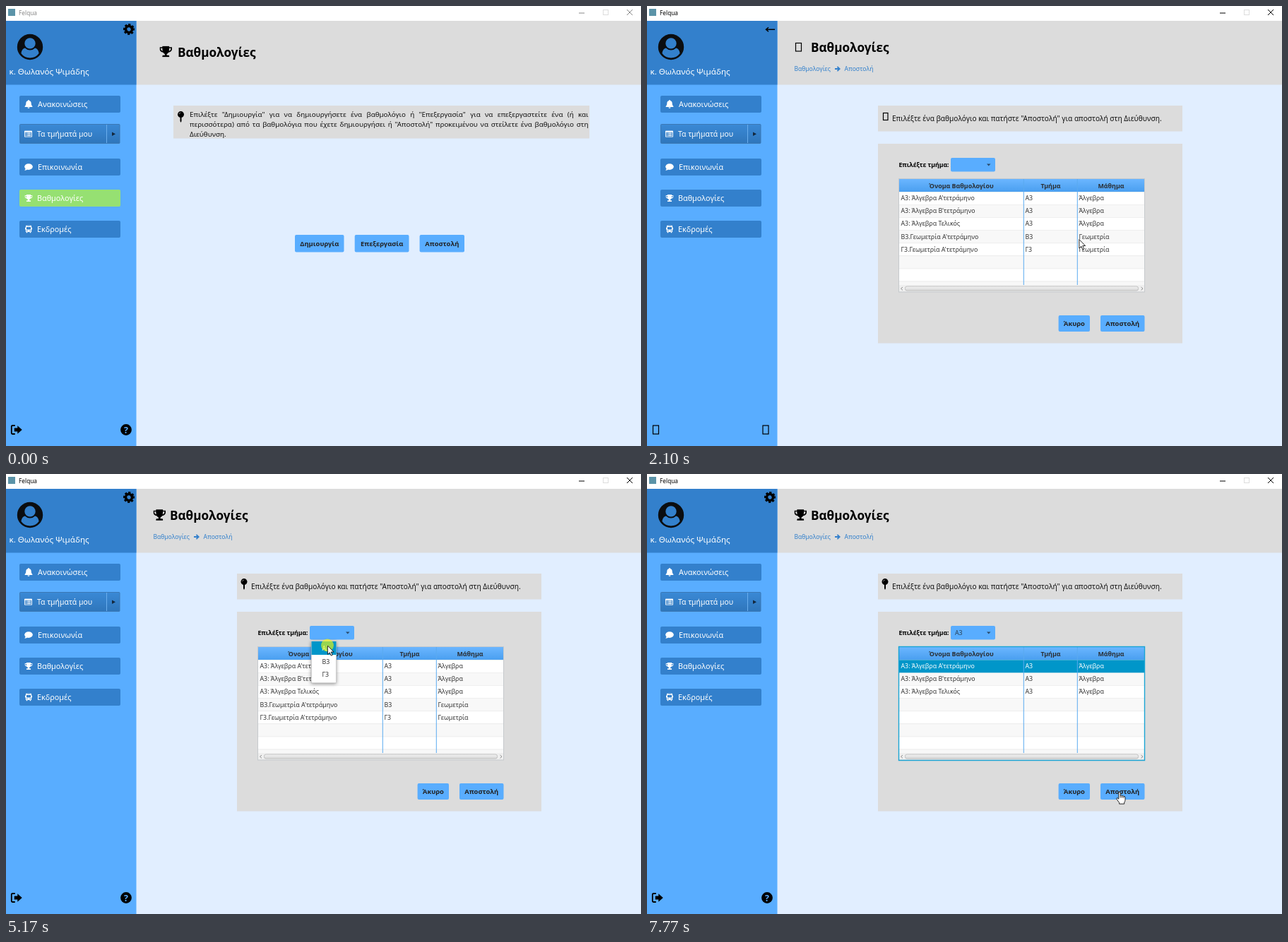
An HTML page for the animation above (8 s loop, 899x623 px).

```html
<!DOCTYPE html>
<html lang="el">
<head>
<meta charset="utf-8">
<title>Felqua</title>
<style>
html, body { margin: 0; width: 100%; height: 100%; overflow: hidden; background: #e1eeff; }
svg { display: block; width: 100%; height: 100%; font-family: "Noto Sans", "Open Sans", sans-serif; }
text { white-space: pre; }
.note { font-size: 9.8px; line-height: 14px; color: #111; }
.note div { white-space: nowrap; }
.note .full { text-align: justify; text-align-last: justify; }
</style>
</head>
<body>
<svg id="stage" viewBox="0 0 899 623" xmlns="http://www.w3.org/2000/svg"></svg>
<script>
const LOOP = 8000;
const BLUE = '#59adff', DEEP = '#3380cc', GRAY = '#dcdcdc', PICK = '#0096c9';
const stage = document.getElementById('stage');

const rect = (x, y, w, h, fill, more = '') =>
  `<rect x="${x}" y="${y}" width="${w}" height="${h}" fill="${fill}" ${more}/>`;
const text = (x, y, size, str, fill = '#111', more = '') =>
  `<text x="${x}" y="${y}" font-size="${size}" fill="${fill}" ${more}>${str}</text>`;
const icon = (id, x, y, w, h, color = '#000') =>
  `<use href="#${id}" x="${x}" y="${y}" width="${w}" height="${h}" color="${color}"/>`;
const group = (id, body) => `<g id="${id}">${body}</g>`;
const symbol = (id, w, h, body) =>
  `<symbol id="${id}" viewBox="0 0 ${w} ${h}" fill="currentColor">${body}</symbol>`;
const tofu = (x, y, w, h) => rect(x, y, w, h, 'none', 'stroke="#000" stroke-width="1.2"');
const bold = 'font-weight="700"';
const mid = bold + ' text-anchor="middle"';
const button = ([x, y, w, h, label]) =>
  rect(x, y, w, h, BLUE, 'rx="2"') + text(x + w / 2, y + h / 2 + 3.5, 9.4, label, '#222', mid);

const homeButtons = [
  [409, 324, 69.5, 24.5, 'Δημιουργία'],
  [493.7, 324, 76.8, 24.5, 'Επεξεργασία'],
  [585.6, 324, 63.4, 24.5, 'Αποστολή']
];
const sendButtons = [
  [582.6, 438, 44.4, 23, 'Άκυρο'],
  [642, 438, 62.5, 23, 'Αποστολή']
];

const defs = `<defs>
<linearGradient id="head" x2="0" y2="1"><stop stop-color="#6bb6ff"/><stop offset="1" stop-color="#4a9ff0"/></linearGradient>
<linearGradient id="split" x2="0" y2="1"><stop stop-color="#3a89d6"/><stop offset="1" stop-color="#2f76bb"/></linearGradient>
<linearGradient id="thumb" x2="0" y2="1"><stop stop-color="#f4f4f4"/><stop offset="1" stop-color="#d6d6d6"/></linearGradient>
<filter id="shade" x="-30%" y="-30%" width="160%" height="160%"><feDropShadow dx="0" dy="1" stdDeviation="2.5" flood-opacity=".45"/></filter>` +
symbol('trophy', 18, 16, `<path fill-rule="evenodd" d="M4 0h10v1.5h4v3c0 2.5-2.5 4.5-5 4.8-.9 1.2-1.8 1.9-2.6 2.2v1.8h2.4c.8 0 1.2.7 1.2 1.3V16H4v-1.4c0-.6.5-1.3 1.2-1.3h2.4v-1.8C6.8 11.2 5.9 10.5 5 9.3 2.5 9 0 7 0 4.5v-3h4zM1.7 3.2v1.3c0 1 1.1 2.2 2.7 2.7A11 11 0 0 1 4 3.2zM16.3 3.2H14c0 1.6-.1 2.9-.4 4 1.6-.5 2.7-1.7 2.7-2.7z"/>`) +
symbol('bell', 12, 13, `<path d="M5.2 0h1.6v1C9 1.4 10 3 10 5c0 2.8 .8 3.8 1.8 4.8v1H.2v-1C1.2 8.800 2 7.8 2 5c0-2 1-3.600 3.2-4zM4.3 11.5h3.4a1.7 1.5 0 0 1-3.4 0z"/>`) +
symbol('list', 12, 10, `<path fill-rule="evenodd" d="M1 0h10q1 0 1 1v8q0 1-1 1H1q-1 0-1-1V1q0-1 1-1zM1 2.5V9h10V2.5z"/><path d="M2 3.4h1.2v1H2zm2.2 0H10v1H4.2zM2 5.3h1.2v1H2zm2.2 0H10v1H4.2zM2 7.2h1.2v1H2zm2.2 0H10v1H4.2z"/>`) +
symbol('chat', 13, 11, `<ellipse cx="6.500" cy="5" rx="6.3" ry="4.7"/><path d="M1.8 7.5q0 2-1.5 3 3 .2 4.7-1.5z"/>`) +
symbol('bus', 11, 12, `<path fill-rule="evenodd" d="M2.5 0h6Q10 0 10 1.5V3.500h1v3h-1V10.500H9V12H7.500V10.500h-4V12H2V10.500H1v-4H0v-3h1v-2Q1 0 2.5 0zM2.200 2.600v3.900h6.600V2.600zM2.200 8v1.300h1.500V8zm5.100 0v1.300h1.500V8zM3.500 1v.7h4V1z"/>`) +
symbol('pin', 10, 16, `<circle cx="5" cy="4.6" r="4.5"/><path d="M4 8.5h2V14l-1 2-1-2z"/><path d="M2.500 4.3Q2.7 2.3 4.8 2" fill="none" stroke="#bbb" stroke-width=".7"/>`) +
symbol('gear', 18, 18, `<g fill="none" stroke="currentColor" transform="rotate(-13 9 9)"><circle cx="9" cy="9" r="6.4" stroke-width="3.2" stroke-dasharray="2.9 2.126"/><circle cx="9" cy="9" r="4.5" stroke-width="3.6"/></g>`) +
symbol('exit', 16, 14, `<path d="M6 1H2.5Q1 1 1 2.5v9Q1 13 2.5 13H6" fill="none" stroke="currentColor" stroke-width="1.9"/><path d="M5 4.6h4.5V1.2L16 7l-6.5 5.8V9.4H5z"/>`) +
symbol('arrow', 8, 8, `<path d="M0 3.1h4.3L2.9 1.5 4 .3 8 4 4 7.7 2.9 6.5l1.4-1.6H0z"/>`) + `</defs>`;

function side(y, id, label, w, h, shift = 0, fill = DEEP) {
  return rect(19, y, 143, 24, fill, 'rx="2"') +
    icon(id, 32 - w / 2, y + 12 - h / 2, w, h, '#fff') +
    text(44 + shift, y + 15.8, 10.8, label, '#fff');
}

const sidebar = rect(0, 21, 184.5, 602, BLUE) + rect(0, 21, 184.5, 90.5, DEEP) +
  `<circle cx="34" cy="58" r="18.2" fill="#0b0d10"/><circle cx="34" cy="52.9" r="7.7" fill="${DEEP}"/>
   <path d="M26.9 59.4Q30 62.5 34 62.5T41.1 59.4Q45.5 60 46.6 66.9 42 73.4 34 73.4T21.4 66.9Q22.5 60 26.9 59.4z" fill="${DEEP}"/>` +
  text(4.5, 97, 11.6, 'κ. Θωλανός Ψιμάδης', '#fff') +
  side(127, 'bell', 'Ανακοινώσεις', 12, 12, 1) +
  rect(19.5, 167.5, 141.5, 27, 'url(#split)', 'stroke="#3b78b4" rx="1"') +
  `<path d="M142.5 168v26" stroke="#6aaeee"/><path d="M150 178.5l5 2.7-5 2.7z" fill="#14283c"/>` +
  icon('list', 26, 176.3, 11, 9.5, '#fff') + text(44, 185, 10.4, 'Τα τμήματά μου', '#fff') +
  side(216, 'chat', 'Επικοινωνία', 12, 11, 1) +
  side(304, 'bus', 'Εκδρομές', 10, 11);

const grades = fill => side(260, 'trophy', 'Βαθμολογίες', 11, 10, 0, fill);

const windowBar = rect(0, 0, 899, 21, '#fff') + rect(3, 4, 10, 10, '#5b93a8') +
  `<g id="caption">${text(18, 12.8, 8.3, 'Felqua', 'currentColor')}
   <path d="M811 10h8M879 5l8 8m0-8l-8 8" stroke="currentColor" fill="none"/></g>
   <rect x="845.5" y="5.5" width="7" height="7" fill="none" stroke="#ddd"/>`;

const sideIcons = icon('gear', 165, 24, 18, 18) + icon('exit', 6.5, 593, 16.5, 14) +
  `<circle cx="170" cy="600" r="7.9"/>` + text(170, 604.6, 12.5, '?', BLUE, mid);

const home = grades('#96e072') +
  icon('trophy', 217.5, 56.5, 17.5, 16) + text(243, 71.5, 17.15, 'Βαθμολογίες', '#000', bold) +
  rect(237, 141, 589, 46.5, GRAY) + icon('pin', 242.5, 149, 10, 16) +
  `<foreignObject x="260" y="147" width="564.5" height="46"><div class="note">
   <div class="full">Επιλέξτε "Δημιουργία" για να δημιουργήσετε ένα βαθμολόγιο ή "Επεξεργασία" για να επεξεργαστείτε ένα (ή και</div>
   <div class="full">περισσότερα) από τα βαθμολόγια που έχετε δημιουργήσει ή "Αποστολή" προκειμένου να στείλετε ένα βαθμολόγιο στη</div>
   <div>Διεύθυνση.</div></div></foreignObject>` +
  homeButtons.map(button).join('');

const rowY = i => 263 + 18.1 * i;
const cells = (i, list, fill) =>
  list.map((s, c) => text([359.5, 535.5, 611.5][c], rowY(i) + 12.2, 8.8, s, fill)).join('');
const rows = [
  ["Α3: Άλγεβρα Α'τετράμηνο", 'Α3', 'Άλγεβρα'],
  ["Α3: Άλγεβρα Β'τετράμηνο", 'Α3', 'Άλγεβρα'],
  ['Α3: Άλγεβρα Τελικός', 'Α3', 'Άλγεβρα'],
  ["Β3.Γεωμετρία Α'τετράμηνο", 'Β3', 'Γεωμετρία'],
  ["Γ3.Γεωμετρία Α'τετράμηνο", 'Γ3', 'Γεωμετρία']
];
const stripes = Array.from({ length: 8 }, (_, i) =>
  rect(357, rowY(i), 347, i < 7 ? 18.1 : 5.5, i % 2 ? '#f8f8f8' : '#fff') +
  rect(357, rowY(i), 347, 0.7, '#ececec')).join('');

const table = stripes + rect(357, 245, 347, 18, 'url(#head)') +
  [[445, 'Όνομα Βαθμολογίου'], [571.5, 'Τμήμα'], [657, 'Μάθημα']]
    .map(([x, s]) => text(x, 257.6, 8.9, s, '#2b3036', mid)).join('') +
  group('picked', rect(357, 263.3, 347, 18, PICK)) +
  group('first', cells(0, rows[0], 'currentColor')) +
  cells(1, rows[1], '#333') + cells(2, rows[2], '#333') +
  group('others', cells(3, rows[3], '#333') + cells(4, rows[4], '#333')) +
  `<path d="M533.3 245v150M609.3 245v150" stroke="#5aabf0"/>` +
  rect(357, 395, 347, 9.5, '#efefef') +
  rect(365.5, 397, 330, 6, 'url(#thumb)', 'rx="2.5" stroke="#b5b5b5" stroke-width=".8"') +
  `<path d="M362 398l-2.5 2.2 2.5 2.2M699.5 398l2.5 2.2-2.5 2.2" fill="none" stroke="#777" stroke-width=".8"/>` +
  rect(356.5, 244.5, 348, 160.5, 'none', 'stroke="#c4c8cc" stroke-width=".9"') +
  group('focus', rect(356.5, 244.5, 348, 161, 'none', 'stroke="#1aa5d4" stroke-width="1.4"'));

const popup = rect(432, 236.5, 35.5, 59.5, '#fff', 'filter="url(#shade)"') +
  rect(432.3, 236.8, 35, 59, '#fff', 'stroke="#b8b8b8" stroke-width=".7"') +
  group('hover', rect(432.5, 237, 35, 19, PICK)) +
  group('option', text(447.5, 249.5, 8.8, 'Α3', 'currentColor')) +
  text(447.5, 268.7, 8.8, 'Β3', '#333') + text(447.5, 287.4, 8.8, 'Γ3', '#333');

const send = grades(DEEP) + text(232, 65, 17.15, 'Βαθμολογίες', '#000', bold) +
  text(208.5, 92, 8.5, 'Βαθμολογίες', DEEP) + icon('arrow', 266, 85, 8, 8, DEEP) +
  text(279.5, 92, 8.6, 'Αποστολή', DEEP) +
  rect(327, 141, 431, 36.5, GRAY) + rect(327, 195, 431, 282.5, GRAY) +
  text(347, 163, 10.1, 'Επιλέξτε ένα βαθμολόγιο και πατήστε "Αποστολή" για αποστολή στη Διεύθυνση.') +
  text(356.5, 228, 8.7, 'Επιλέξτε τμήμα:', '#000', bold) +
  rect(430, 215, 63, 19.5, BLUE, 'rx="2"') + `<path d="M481 223.5h5.5l-2.75 3z" fill="#2a4a6a"/>` +
  group('choice', text(436, 228, 8.8, 'Α3', '#2c4257')) +
  table + sendButtons.map(button).join('') +
  group('ready', icon('trophy', 208.5, 50, 17.5, 16) + icon('pin', 332, 148, 10, 16)) +
  group('loading', tofu(210.5, 52.5, 8, 11.5) + tofu(334.5, 151.5, 6.5, 10) +
    tofu(8.5, 594, 8, 12) + tofu(164, 594, 8, 12) +
    `<path d="M181 33.3h-12.5m3.5-3l-3.5 3 3.5 3" fill="none" stroke="#000" stroke-width="1.5"/>`) +
  group('popup', popup);

const pointers =
  `<circle id="click" r="9" fill="#ff0" fill-opacity=".6"/>` +
  `<path id="arrowPtr" d="M.4 .5V13L3.3 10.3 5.2 14.7 7.2 13.8 5.3 9.5H9.1z" fill="#fff" stroke="#111" stroke-width=".9"/>` +
  `<path id="handPtr" d="M-1.2 1.3Q0-.5 1.2 1.3V6Q2.6 5 3.5 6.3 5 5.4 5.8 6.9 8 6.4 8 8.6V12Q8 14 6.7 15.5V17.6H-.4V15.8L-4 11Q-4.6 9.2-3.2 9L-1.2 10.7zM1.2 6v3M3.5 6.3V9M5.8 7v2.3" fill="#fff" stroke="#111" stroke-width=".9" stroke-linejoin="round"/>`;

stage.innerHTML = defs + rect(0, 0, 899, 623, '#e1eeff') + rect(184.5, 21, 714.5, 90.5, GRAY) +
  windowBar + sidebar + group('sideIcons', sideIcons) + group('home', home) + group('send', send) + pointers;

const el = id => document.getElementById(id);
const show = (id, on) => el(id).setAttribute('visibility', on ? 'inherit' : 'hidden');
const tint = (id, color) => el(id).setAttribute('color', color);

const ease = p => p * p * (3 - 2 * p);
const line = (a, b, n) => Array.from({ length: n }, (_, i) => {
  const p = ease((i + 1) / n);
  return [a[0] + (b[0] - a[0]) * p, a[1] + (b[1] - a[1]) * p];
});

// Pointer moves: start, end, one position per step.
const moves = [
  [370, 1110, [[773, 569], [671, 470], [618, 422], [480, 364], [411, 340], [420, 338], [468, 336], [532, 335]]],
  [1220, 1550, line([532, 335], [611.5, 330], 4)],
  [2630, 3390, line([611, 330.5], [483, 229], 8)],
  [3510, 3740, [[481, 226], [481, 223], [481, 222]]],
  [4600, 5170, line([481, 222], [455, 242.5], 6)],
  [5720, 6140, line([455, 242.5], [488, 272], 5)],
  [7020, 7770, line([488, 272], [669, 449.5], 8)]
];

function pointerAt(t) {
  let pos = null;
  for (const [from, to, pts] of moves) {
    if (t < from) break;
    const k = Math.floor((t - from) / (to - from) * (pts.length - 1) + 0.06);
    pos = pts[Math.min(k, pts.length - 1)];
  }
  return pos;
}

const within = (t, a, b) => t >= a && t < b;
const inside = ([x, y], [bx, by, w, h]) => x >= bx && x <= bx + w && y >= by && y <= by + h;
const clicks = [[1770, 1880], [4070, 4170], [5170, 5280], [6480, 6570]];

function draw(t) {
  const sent = t >= 2100, loading = within(t, 2100, 2200);
  const chosen = t >= 5280, picked = t >= 6570;
  const open = within(t, 4170, 5280);
  const pos = pointerAt(t);

  tint('caption', t < 1770 ? '#888' : '#000');
  show('home', !sent);
  show('send', sent);
  show('sideIcons', !loading);
  show('loading', loading);
  show('ready', sent && !loading);
  show('choice', chosen);
  show('others', sent && !chosen);
  show('picked', picked);
  show('focus', picked);
  tint('first', picked ? '#fff' : '#333');

  const over = open && inside(pos, [432, 236, 36, 20]);
  show('popup', open);
  show('hover', over);
  tint('option', over ? '#fff' : '#333');

  const hand = pos && !loading && (sent ? sendButtons : homeButtons).some(b => inside(pos, b));
  show('handPtr', hand);
  show('arrowPtr', pos && !hand);
  show('click', clicks.some(([a, b]) => within(t, a, b)));
  if (pos) {
    for (const id of ['handPtr', 'arrowPtr', 'click'])
      el(id).setAttribute('transform', `translate(${pos[0]} ${pos[1]})`);
  }
}

function tick() {
  draw(performance.now() % LOOP);
  requestAnimationFrame(tick);
}
tick();
</script>
</body>
</html>
```
